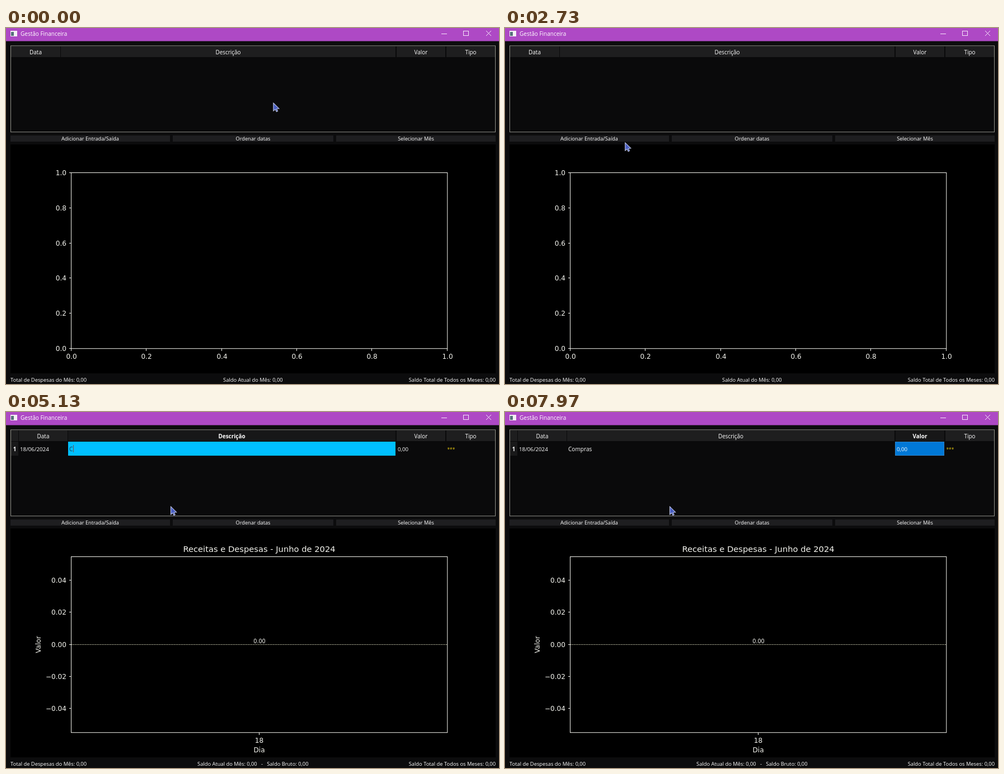
Animation, 881 px wide and 636 px high, one loop 8000 ms. Source, as an HTML page with a canvas:

```html
<!DOCTYPE html>
<html lang="pt">
<head>
<meta charset="utf-8">
<title>Gestão Financeira</title>
<style>
  html, body { margin: 0; width: 100%; height: 100%; overflow: hidden; background: #0c0c0d; }
  canvas { display: block; }
</style>
</head>
<body>
<canvas id="stage" width="881" height="636"></canvas>
<script>
const ctx = document.getElementById('stage').getContext('2d');
const LOOP = 8000;
const ROW_ADDED = 3150, TYPING = 5040, KEY_STEP = 170, COMMIT = 6420, NEXT_CELL = 7400;
const UI = '"Open Sans", "Noto Sans", sans-serif';
const PLOT = '"DejaVu Sans", sans-serif';
const WHITE = '#fff', AXIS = '#f4f4ee', BLUE = '#0078d7';
const AXES = { left: 116.5, right: 788.8, top: 258.5, bottom: 572.7 };
const ROW = { top: 53, height: 25, baseline: 69.6 };

// Pointer tip: time, x, y
const pointerPath = [
  [0, 478, 134], [1570, 284.5, 160.5], [2730, 214.8, 205], [2950, 208, 199],
  [3250, 208, 199], [4230, 279, 171], [4600, 294.5, 169], [LOOP, 294.5, 169]
];

function box(x, y, w, h, color) {
  ctx.fillStyle = color;
  ctx.fillRect(x, y, w, h);
}

function line(color, ...points) {
  ctx.strokeStyle = color;
  ctx.lineWidth = 1;
  ctx.beginPath();
  points.forEach(([x, y]) => ctx.lineTo(x, y));
  ctx.stroke();
}

function frame(x, y, w, h, color) {
  ctx.strokeStyle = color;
  ctx.lineWidth = 1;
  ctx.strokeRect(x, y, w, h);
}

function text(string, x, y, { size = 9.35, align = 'left', color = WHITE, font = UI, weight = 400 } = {}) {
  ctx.font = `${weight} ${size}px ${font}`;
  ctx.textAlign = align;
  ctx.fillStyle = color;
  ctx.fillText(string, x, y);
}

const plotText = (string, x, y, align = 'center', size = 12.1) =>
  text(string, x, y, { size, align, font: PLOT, color: AXIS });

function drawTitleBar() {
  box(0, 0, 881, 23.5, '#ae49c5');
  box(8, 5, 12, 10, '#f4f0f4');
  box(9, 7, 5, 7, '#57707c');
  text('Gestão Financeira', 26, 13.7, { size: 10 });
  line('#f6e6fa', [778, 10.5], [788, 10.5]);
  frame(817.5, 5.5, 9, 8, '#f6e6fa');
  line('#f6e6fa', [858, 5], [867, 14]);
  line('#f6e6fa', [867, 5], [858, 14]);
}

function drawHeader(label, left, right, selected) {
  box(left, 33, right - left, 19, selected ? '#171718' : '#1e1e1f');
  text(label, (left + right) / 2, 46.6, { size: 9.95, align: 'center', weight: selected ? 700 : 400 });
}

function drawSelectedCell(x, w) {
  box(x, ROW.top, w, ROW.height, BLUE);
  ctx.setLineDash([1, 1]);
  frame(x + 0.5, ROW.top + 0.5, w - 1, ROW.height - 1, '#5a8fb8');
  ctx.setLineDash([]);
}

function drawDescription(t) {
  const style = { size: 10.1 };
  if (t >= COMMIT) {
    if (t < NEXT_CELL) drawSelectedCell(110, 587);
    return text('Compras', 113, ROW.baseline, style);
  }

  box(111, ROW.top, 585, ROW.height, '#00bfff');
  if (t < TYPING) {
    box(113, 59, 96, 14, BLUE);
    return text('# Sua descrição aqui', 113.5, ROW.baseline, { size: 9.7, color: '#d6f2ff' });
  }
  const typed = 'Compras'.slice(0, 1 + Math.floor((t - TYPING) / KEY_STEP));
  text(typed, 113, ROW.baseline, { ...style, color: '#123a50' });
  box(114 + Math.round(ctx.measureText(typed).width), 59, 1, 13, '#7a5048');
}

function drawTable(t) {
  const filled = t >= ROW_ADDED;
  const onValue = t >= NEXT_CELL;
  box(8, 31, 867, 155, '#0a0a0b');
  if (filled) box(9, 33, 13, 19, '#1e1e1f');
  drawHeader('Data', filled ? 23 : 9, filled ? 110 : 97);
  drawHeader('Descrição', filled ? 111 : 98, 696, filled && !onValue);
  drawHeader('Valor', 698, 785, onValue);
  drawHeader('Tipo', 787, 874);

  if (filled) {
    box(9, ROW.top, 13, ROW.height, '#19191a');
    text('1', 15.5, ROW.baseline, { size: 9.7, align: 'center', weight: 700 });
    text('18/06/2024', 25, ROW.baseline, { size: 9.75 });
    drawDescription(t);
    if (onValue) drawSelectedCell(697, 88);
    text('0,00', 700, ROW.baseline, { size: 9.75 });
    text('***', 788.5, 70, { size: 8.4, color: '#e2c410' });
  }
  frame(8.5, 31.8, 866, 154, '#929289');
}

function drawButton(label, left, right) {
  box(left, 192, right - left, 11, '#1e1e20');
  text(label, (left + right) / 2, 201.2, { size: 9.2, align: 'center' });
}

function drawEmptyPlot() {
  for (let i = 0; i <= 5; i++) {
    const label = (i / 5).toFixed(1);
    const x = Math.round(117 + i * 134.3) - 0.5;
    const y = Math.round(573 - i * 62.8) - 0.5;
    line(AXIS, [x, 573], [x, 577]);
    line(AXIS, [113, y], [117, y]);
    plotText(label, x + 0.5, 591);
    plotText(label, 108, y + 4.7, 'right');
  }
}

function drawMonthPlot() {
  for (let i = -2; i <= 2; i++) {
    const y = Math.round(415.5 - i * 57.2) - 0.5;
    line(AXIS, [113, y], [117, y]);
    plotText((i < 0 ? '−' : '') + Math.abs(i * 0.02).toFixed(2), 108, y + 4.5, 'right');
  }
  ctx.setLineDash([2, 1]);
  line('#b4b49c', [117, 415.5], [788, 415.5]);
  ctx.setLineDash([]);
  line(AXIS, [452.5, 573], [452.5, 577]);
  plotText('Receitas e Despesas - Junho de 2024', 452.5, 249.5, 'center', 14.7);
  plotText('0.00', 453, 413, 'center', 9.7);
  plotText('18', 452.5, 591);
  plotText('Dia', 452.5, 607.5);
  ctx.save();
  ctx.translate(62, 415.5);
  ctx.rotate(-Math.PI / 2);
  plotText('Valor', 0, 0);
  ctx.restore();
}

function drawPointer(t) {
  const next = pointerPath.findIndex(p => p[0] > t);
  const [t0, x0, y0] = pointerPath[next - 1];
  const [t1, x1, y1] = pointerPath[next];
  const k = (t - t0) / (t1 - t0);
  ctx.save();
  ctx.translate(x0 + (x1 - x0) * k, y0 + (y1 - y0) * k);
  ctx.scale(0.94, 0.94);
  ctx.beginPath();
  [[0, 0], [0, 15], [3.6, 12], [5.8, 16.5], [8.2, 15.4], [6.2, 11], [10.8, 10.6]]
    .forEach(([x, y]) => ctx.lineTo(x, y));
  ctx.closePath();
  ctx.fillStyle = '#4a5fc2';
  ctx.fill();
  ctx.strokeStyle = '#c3c9e6';
  ctx.lineWidth = 1.1;
  ctx.stroke();
  ctx.restore();
}

function draw(t) {
  const filled = t >= ROW_ADDED;
  box(0, 0, 881, 636, '#0c0c0d');
  drawTitleBar();
  drawTable(t);
  drawButton('Adicionar Entrada/Saída', 8, 293);
  drawButton('Ordenar datas', 298, 585);
  drawButton('Selecionar Mês', 590, 875);

  box(8, 208, 867, 409, '#000');
  filled ? drawMonthPlot() : drawEmptyPlot();
  frame(AXES.left, AXES.top, AXES.right - AXES.left, AXES.bottom - AXES.top, AXIS);

  text('Total de Despesas do Mês: 0,00', 8, 632);
  text('Saldo Atual do Mês: 0,00' + (filled ? '\u00a0\u00a0 - \u00a0\u00a0Saldo Bruto: 0,00' : ''), 441.3, 632, { align: 'center' });
  text('Saldo Total de Todos os Meses: 0,00', 875, 632, { align: 'right' });
  drawPointer(t);
}

const start = performance.now();
function tick() {
  draw((performance.now() - start) % LOOP);
  requestAnimationFrame(tick);
}
tick();
</script>
</body>
</html>
```
